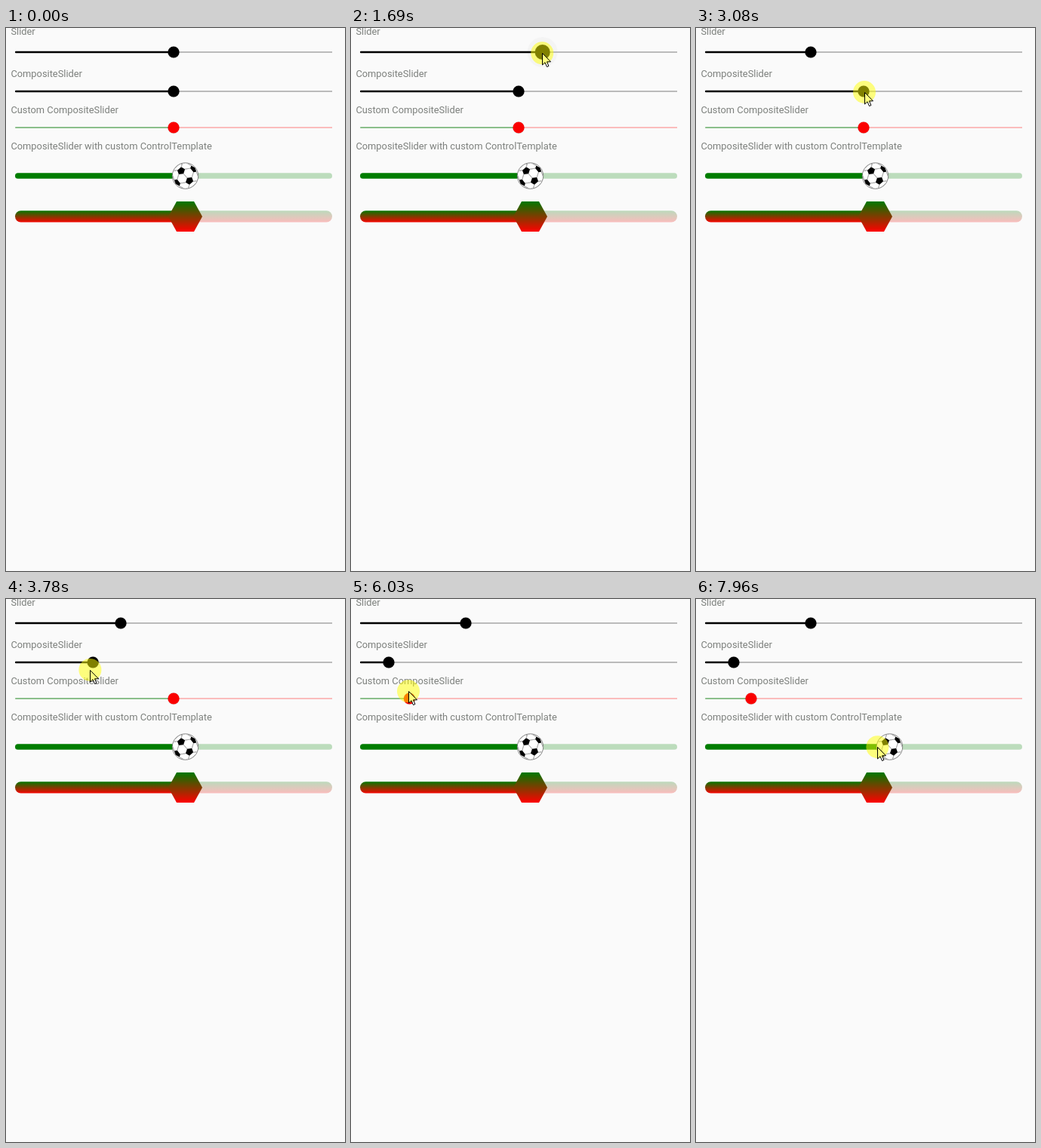
Recreate the animation shown at these times as an HTML page with a canvas. Size 449 by 720 pixels, loop 8 s.

```html
<!DOCTYPE html>
<html lang="en">
<head>
<meta charset="utf-8">
<title>Sliders</title>
<style>
html, body { margin: 0; width: 100%; height: 100%; overflow: hidden; background: #fafafa; }
canvas { display: block; width: 449px; height: 720px; }
</style>
</head>
<body>
<canvas id="stage" width="449" height="720"></canvas>
<script>
const ctx = document.getElementById('stage').getContext('2d');
const LOOP = 8000, STEP = 77.45, TRAVEL = 750;
const LEFT = 12, RIGHT = 432, MIDDLE = 222;
const PHI = (1 + Math.sqrt(5)) / 2;

// Each gesture: travel to a thumb, press it, drag right to a far point, drag back and let go
const gestures = [
  { move: 70, press: 1150, drag: 1300, turn: 1650, drop: 2110, release: 2150,
    grab: { x: 217, y: 28 }, far: 255, end: { x: 152, y: 39 } },
  { move: 2150, press: 3080, drag: 3150, turn: 3460, drop: 3930, release: 4160,
    grab: { x: 223, y: 85 }, far: 316, end: { x: 50, y: 96 } },
  { move: 4405, press: 5420, drag: 5420, turn: 5700, drop: 6050, release: 6180,
    grab: { x: 221, y: 130 }, far: 335, end: { x: 73, y: 122 } },
  { move: 6425, press: 7190, drag: 7290, turn: 7685, drop: 8100, release: 8100,
    grab: { x: 236, y: 192 }, far: 363, end: { x: 200, y: 197 } }
];
const start = { x: 221, y: 40 };

const mix = (a, b, k) => a + (b - a) * k;
const progress = (t, from, to) => Math.min(1, Math.max(0, (t - from) / (to - from)));
const easeOut = (u, power) => 1 - (1 - u) ** power;
const swing = u => (1 - Math.cos(Math.PI * u)) / 2;

function dragX(g, t) {
  return t < g.turn
    ? mix(g.grab.x, g.far, swing(progress(t, g.drag, g.turn)))
    : mix(g.far, g.end.x, swing(progress(t, g.turn, g.drop)));
}

function pointerAt(t) {
  const i = Math.max(0, gestures.findLastIndex(g => t >= g.move));
  const g = gestures[i], from = i ? gestures[i - 1].end : start;
  if (t >= g.drag) {
    return { x: dragX(g, t), y: mix(g.grab.y, g.end.y, progress(t, g.drag, g.drop)) };
  }
  const u = progress(t, g.move, g.move + TRAVEL);
  return {
    x: mix(from.x, g.grab.x, easeOut(u, 2.5)),
    y: mix(from.y, g.grab.y, easeOut(u, 5))
  };
}

function thumbX(g, t) {
  return t < g.drag + 20 ? MIDDLE : dragX(g, t - 5);
}

function disc(x, y, r, fill) {
  ctx.fillStyle = fill;
  ctx.beginPath();
  ctx.arc(x, y, r, 0, Math.PI * 2);
  ctx.fill();
}

function polygon(points, fill) {
  ctx.beginPath();
  points.forEach(([x, y]) => ctx.lineTo(x, y));
  ctx.closePath();
  ctx.fillStyle = fill;
  ctx.fill();
}

function bar(x1, x2, y, height, fill, radius = 0, alpha = 1) {
  ctx.globalAlpha = alpha;
  ctx.fillStyle = fill;
  ctx.beginPath();
  ctx.roundRect(x1, y - height / 2, x2 - x1, height, radius);
  ctx.fill();
  ctx.globalAlpha = 1;
}

function fade(top, bottom) {
  const g = ctx.createLinearGradient(0, top, 0, bottom);
  g.addColorStop(0, '#007800');
  g.addColorStop(1, '#ff0000');
  return g;
}

function label(text, y) {
  ctx.fillStyle = '#7d807d';
  ctx.font = '12.85px Roboto, sans-serif';
  ctx.fillText(text, 6.4, y);
}

function thinSlider(x, y, r, thumb, active, inactive, weight) {
  bar(x, RIGHT, y, 2.2, inactive);
  bar(LEFT, x, y, weight, active, 1);
  disc(x, y + .2, r + .5, 'rgba(0,0,0,.1)');
  disc(x, y, r, thumb);
}

// Icosahedron corners: the centres of the ball's dark patches
const corners = [];
for (const a of [-1, 1]) {
  for (const b of [-PHI, PHI]) corners.push([0, a, b], [a, b, 0], [b, 0, a]);
}
const apart = (v, w) => Math.hypot(...v.map((c, i) => c - w[i]));
const neighbours = v => corners.filter(w => Math.abs(apart(v, w) - 2) < .01);

// A point on the ball a third of the way from one patch centre to another
function ballPoint(v, w, r) {
  const p = v.map((c, i) => mix(c, w[i], .32)), size = r / Math.hypot(...p);
  return p.map(c => c * size);
}

function football(x, y) {
  const r = 17.2;
  ctx.save();
  ctx.translate(x, y);
  disc(0, 0, r, '#fff');
  ctx.lineWidth = .8;
  ctx.strokeStyle = '#666';
  ctx.stroke();
  ctx.clip();
  ctx.rotate(-.7);
  ctx.strokeStyle = '#aaa';
  for (const v of corners.filter(c => c[2] >= 0)) {
    const around = neighbours(v);
    ctx.beginPath();
    for (const w of around) {
      const a = ballPoint(v, w, r), b = ballPoint(w, v, r);
      if (a[2] < 0 || b[2] < 0) continue;
      ctx.moveTo(a[0], a[1]);
      ctx.lineTo(b[0], b[1]);
    }
    ctx.stroke();
    const outline = around.map(w => ballPoint(v, w, r));
    const turn = p => Math.atan2(p[1] - v[1] * r / 1.902, p[0] - v[0] * r / 1.902);
    polygon(outline.sort((p, q) => turn(p) - turn(q)), '#000');
  }
  ctx.restore();
}

function arrow(x, y, paint) {
  ctx.save();
  ctx.translate(Math.round(x) + .5, Math.round(y) + .5);
  polygon([[0, 0], [0, 15.5], [3.5, 12.2], [6, 18], [8.4, 17], [6, 11.3], [11, 11.3]], paint);
  ctx.restore();
}

function pointer(t) {
  const { x, y } = pointerAt(t);
  arrow(x, y, '#fff');
  if (gestures.some(g => t > g.press - 30 && t < g.release - 30)) {
    disc(x, y, 15, 'rgba(255,255,0,.5)');
  }
  arrow(x, y, 'transparent');
  ctx.save();
  ctx.translate(Math.round(x) + .5, Math.round(y) + .5);
  ctx.lineWidth = 1;
  ctx.strokeStyle = '#000';
  ctx.translate(-Math.round(x) - .5, -Math.round(y) - .5);
  ctx.stroke();
  ctx.restore();
}

function draw(t) {
  ctx.fillStyle = '#fafafa';
  ctx.fillRect(0, 0, 449, 720);

  label('Slider', 9);
  label('CompositeSlider', 65);
  label('Custom CompositeSlider', 113);
  label('CompositeSlider with custom ControlTemplate', 161);

  const [plain, composite, custom, rolling] = gestures;
  const held = t > plain.drag + 20 && t < plain.drop;
  const first = thumbX(plain, t);
  if (held) disc(first, 32, 20, 'rgba(0,0,0,.025)');
  thinSlider(first, 32, held ? 10 : 7.6, '#000', '#000', '#bbb', 2.6);
  thinSlider(thumbX(composite, t), 84, 7.6, '#000', '#000', '#bbb', 2.6);
  thinSlider(thumbX(custom, t), 132, 7.6, '#fa0000', '#8bbf8b', '#fbbcbc', 2);

  const fill = dragX(rolling, t - 45) - 13;
  bar(fill - 4, RIGHT, 196, 7.7, '#bcdcbc', 4);
  bar(LEFT, fill, 196, 7.7, '#007d00', 4);
  football(dragX(rolling, t - 26) + 1.5, 196);

  bar(MIDDLE, RIGHT, 249.8, 15.2, fade(242, 258), [0, 8, 8, 0], .25);
  bar(LEFT, 230, 249.8, 15.2, fade(242, 258), 8);
  polygon([[215, 250], [226, 230], [249, 230], [260, 250], [249, 270], [226, 270]], fade(230, 270));

  if (t > 40) pointer(t);
}

function frame(now) {
  const t = now % LOOP;
  draw(Math.floor((t + 20) / STEP) * STEP - 15);
  requestAnimationFrame(frame);
}
draw(0);
requestAnimationFrame(frame);
</script>
</body>
</html>
```
